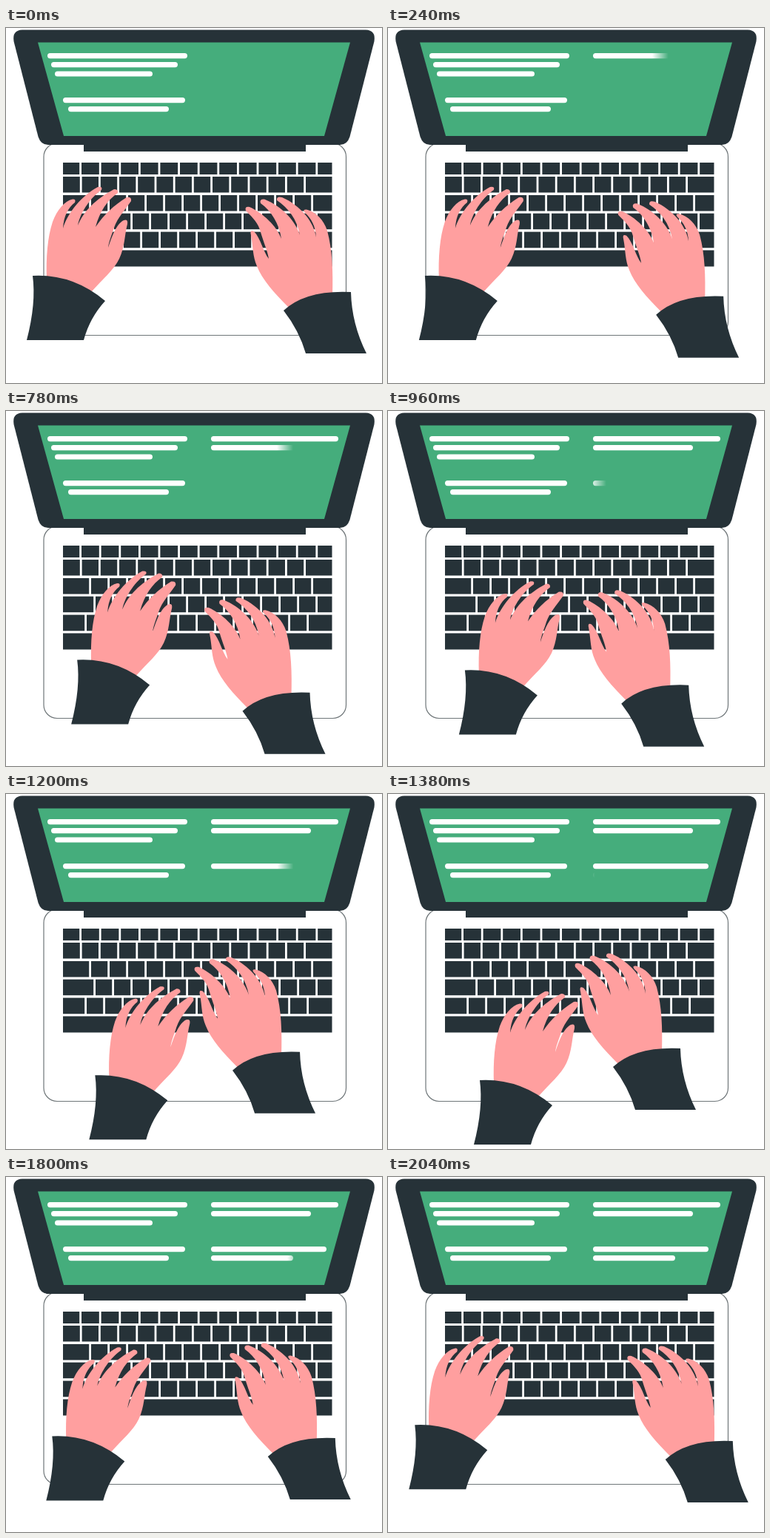
An HTML page for the animation above (2100 ms loop, 508 by 480 pixels).

```html
<!DOCTYPE html>
<html lang="en">
<head>
<meta charset="utf-8">
<title>Typing on a laptop</title>
<style>
  html, body { margin: 0; width: 100%; height: 100%; overflow: hidden; background: #fff; }
  svg { display: block; width: 100%; height: 100%; }
  .dark { fill: #263238; }
  .skin { fill: #ff9f9f; }
</style>
</head>
<body>
<svg viewBox="0 0 508 480">
  <defs id="defs"></defs>
  <rect x="51" y="156" width="408.5" height="259.5" rx="18" fill="#fff" stroke="#6f7679" stroke-width="1.2"/>
  <path class="dark" d="M22 2.5H486Q500 3 497.5 18L464.5 147Q461 158 451 158H57Q47 158 43.5 147L10.5 18Q8 3 22 2.5Z"/>
  <path fill="#45ad7c" d="M43 19.5H465L430 146H78Z"/>
  <rect class="dark" x="105" y="156" width="300" height="11"/>
  <g id="lines" fill="#fff"></g>
  <g id="keys" class="dark"></g>
  <g id="left">
    <path class="skin" d="M55 340C54 310 56 283 63 262C69 246 79 234 90 231.5Q95 231 93 236
      C84 243 78 254 77 271C83 250 103 226 124 215Q131 214 129 219C116 228 101 247 97 267
      C105 248 120 232 146 218Q152 218 151 223C137 233 127 247 121 269C132 253 145 240 163 229Q170 228 169 234
      C160 247 151 256 146 270C143 280 139 288 138 297C143 282 149 265 159 260Q165 258 164 265
      C160 280 161 295 153 312C146 327 130 340 116 356L100 372L60 352Z"/>
    <path class="dark" d="M36 335Q90 332 134 369Q113 392 105 422H28Q41 372 36 335Z"/>
  </g>
  <g id="right">
    <path class="skin" d="M441 362C442 330 441 300 434 274C429 259 419 249 406 245.5Q400 245 404 250
      C413 258 418 268 419 283C416 262 398 240 373 229Q365 227 366 233C381 243 393 258 397 280
      C392 262 373 241 349 231.5Q342 231 344 237C358 247 369 264 372 285C366 268 347 250 329 242Q322 241 324 247
      C334 257 341 264 344 276C348 290 353 300 355 312C348 304 344 284 335 275Q329 272 331 280
      C334 296 333 308 339 322C346 340 362 358 382 378L410 376Z"/>
    <path class="dark" d="M375 382Q405 354 466 357Q467 400 487 440H405Q396 409 375 382Z"/>
  </g>
</svg>
<script>
const LOOP = 2100, STEP = 60;
const byId = id => document.getElementById(id);

function add(parent, tag, attrs) {
  const el = document.createElementNS('http://www.w3.org/2000/svg', tag);
  for (const name in attrs) el.setAttribute(name, attrs[name]);
  parent.appendChild(el);
  return el;
}

// Keyboard: [top, height, left of second key, pitch]
const KEY_LEFT = 77, KEY_RIGHT = 440.5, GAP = 2.8;
const key = (x, y, right, height) => add(byId('keys'), 'rect', { x, y, width: right - x, height });
[[182, 16, 102, 26.6], [201, 21.5, 102.6, 25.2], [226, 21.5, 115, 25],
 [250.7, 21.5, 121, 25], [275.6, 21.7, 109, 25]].forEach(([y, h, second, pitch]) => {
  key(KEY_LEFT, y, second - GAP, h);
  for (let i = 0; i < 13; i++) {
    const x = second + i * pitch;
    key(x, y, i < 12 ? x + pitch - GAP : KEY_RIGHT, h);
  }
});
key(KEY_LEFT, 300.5, KEY_RIGHT, 22);

// Screen: fixed lines on the left, lines being typed on the right
const bar = (x, right, y, fill = '#fff') =>
  add(byId('lines'), 'rect', { x, y, width: right - x, height: 7.2, rx: 3.6, fill });
[[56, 245, 34], [61, 232, 46], [66, 198, 58.4], [77, 242, 94], [84, 220, 106]].forEach(l => bar(...l));

const TYPED_X = 277, FADE = 22, LINE_TIME = 457;
const typed = [[449, 34], [412, 46], [433, 94], [388, 106]].map(([right, y], i) => {
  const gradient = add(byId('defs'), 'linearGradient', { id: 'fade' + i, gradientUnits: 'userSpaceOnUse' });
  add(gradient, 'stop', { offset: 0, 'stop-color': '#fff' });
  add(gradient, 'stop', { offset: 1, 'stop-color': '#fff', 'stop-opacity': 0 });
  bar(TYPED_X, right, y, `url(#fade${i})`);
  return { gradient, span: right - TYPED_X + FADE };
});

// Hands glide through three positions
const SEGMENT = 690;
const hands = {
  left: [[0, 0], [59.3, 0], [88, 52]],
  right: [[0, 0], [-55, 25], [-71, -13]]
};
const ease = p => p < 0.5 ? 0.5 * (2 * p) ** 2.1 : 1 - 0.5 * (2 - 2 * p) ** 2.1;

function draw(t) {
  typed.forEach(({ gradient, span }, i) => {
    const p = Math.min(1, Math.max(0, t / LINE_TIME - i));
    const edge = TYPED_X + span * p;
    gradient.setAttribute('x1', edge - FADE);
    gradient.setAttribute('x2', edge);
  });
  const leg = Math.min(2, Math.floor(t / SEGMENT));
  const p = ease(Math.min(1, t / SEGMENT - leg));
  for (const id in hands) {
    const from = hands[id][leg], to = hands[id][(leg + 1) % 3];
    const [x, y] = from.map((v, axis) => v + (to[axis] - v) * p);
    byId(id).setAttribute('transform', `translate(${x} ${y})`);
  }
}

let start;
function tick(now) {
  start ??= now;
  draw(Math.floor(((now - start) % LOOP) / STEP) * STEP);
  requestAnimationFrame(tick);
}
draw(0);
requestAnimationFrame(tick);
</script>
</body>
</html>
```
